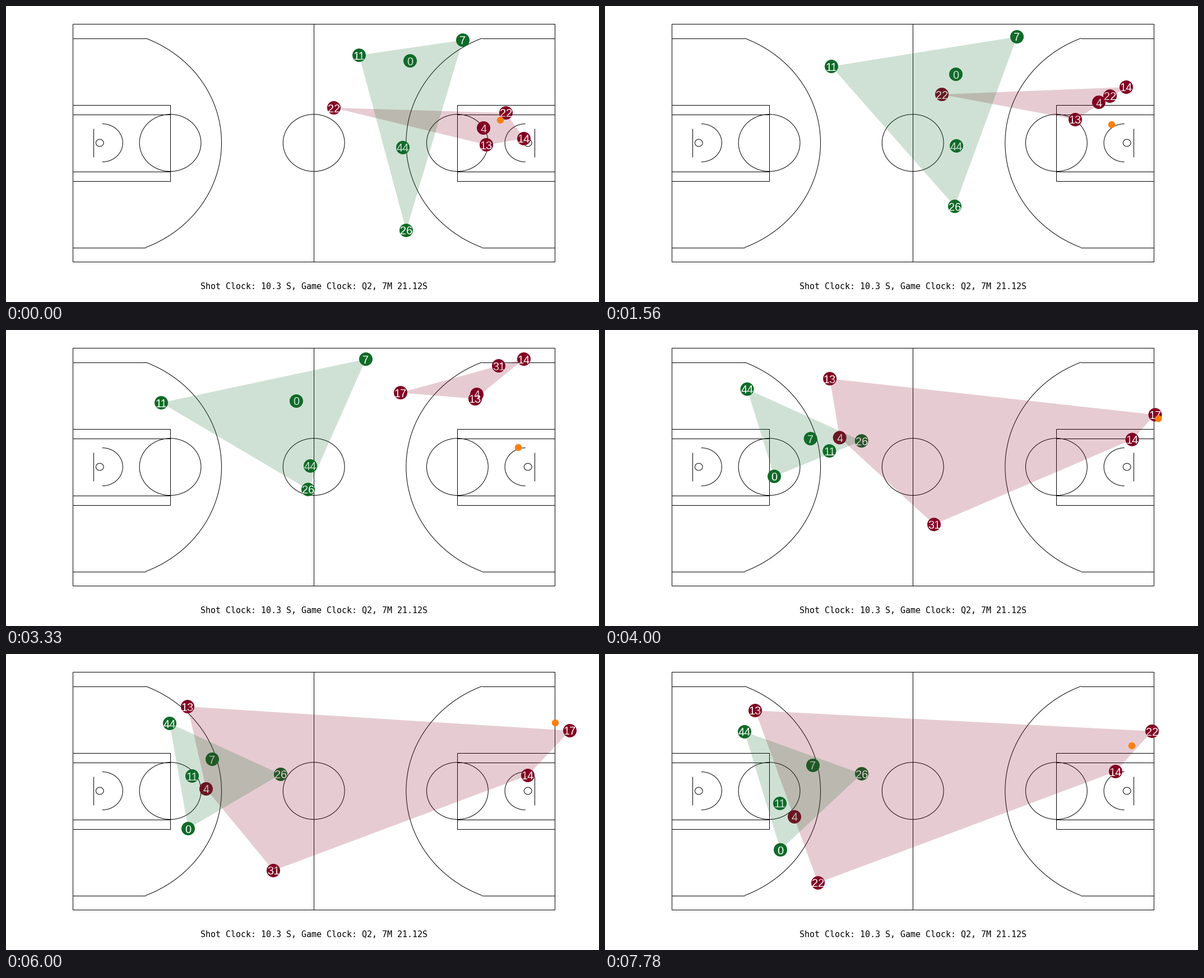
A matplotlib script that plays this animation: 1058x529 px, repeating every 8000 ms.

```python
import numpy as np
import matplotlib.pyplot as plt
from matplotlib.animation import FuncAnimation
from matplotlib.patches import Circle, Ellipse, Polygon, Rectangle

W, H, DPI = 1058, 529, 100
PT = 72 / DPI                       # points per pixel
LOOP_MS, TICK_MS, STEPS = 8000, 50, 36
STEP_MS = LOOP_MS / STEPS           # positions change once per step
CUT, SUB_IN, SUB_OUT = 18, 13, 31   # new possession; substitutions
LEG_TIMES = (0, 7, 15), (22, 27, 35)
GREEN, MAROON, ORANGE = "#0f6b28", "#820022", "#ff7f0e"


def locate(legs, step):
    """Constant acceleration through the three key points of a leg."""
    leg = int(step >= CUT)
    t0, t1, t2 = LEG_TIMES[leg]
    p0, p1, p2 = np.array(legs[leg], float)
    v1, v2 = (p1 - p0) / (t1 - t0), (p2 - p1) / (t2 - t1)
    bend = (v2 - v1) / (t2 - t0)
    return p0 + (step - t0) * (v1 + (step - t1) * bend)


def convex_hull(points):
    pts = sorted(map(tuple, points))

    def chain(seq):
        out = []
        for p in seq:
            while len(out) > 1:
                (ax_, ay), (bx, by) = out[-2:]
                if (bx - ax_) * (p[1] - ay) - (by - ay) * (p[0] - ax_) > 0:
                    break
                out.pop()
            out.append(p)
        return out[:-1]

    return chain(pts) + chain(pts[::-1])


fig = plt.figure(figsize=(W / DPI, H / DPI), dpi=DPI, facecolor="white")
ax = fig.add_axes([0, 0, 1, 1])
ax.set_xlim(0, W)
ax.set_ylim(H, 0)
ax.axis("off")

# Court, in feet: 94 by 50
LEFT, TOP, FX, FY = 119.2, 32.1, 860 / 94, 8.5
PEN = dict(lw=PT, color="black", zorder=1)


def line(*feet):
    xs, ys = zip(*feet)
    ax.plot(LEFT + np.array(xs) * FX, TOP + np.array(ys) * FY,
            solid_capstyle="butt", **PEN)


def box(x0, y0, x1, y1):
    ax.add_patch(Rectangle((LEFT + x0 * FX, TOP + y0 * FY), (x1 - x0) * FX,
                           (y1 - y0) * FY, fill=False, **PEN))


def ring(x, r):
    ax.add_patch(Ellipse((LEFT + x * FX, TOP + 25 * FY), 2 * r * FX,
                         2 * r * FY, fill=False, **PEN))


def draw_half(mirrored):
    def fx(x):
        return 94 - x if mirrored else x

    def arc(x, r, half_angle):
        a = np.linspace(-half_angle, half_angle, 120)
        line(*[(fx(x + r * np.cos(v)), 25 + r * np.sin(v)) for v in a])

    reach = np.arcsin(22 / 23.75)
    corner = 5.25 + 23.75 * np.cos(reach)
    for y in (3, 47):
        line((fx(0), y), (fx(corner), y))
    arc(5.25, 23.75, reach)
    arc(5.74, 4, np.pi / 2)
    for half_width in (8, 6):
        box(fx(0), 25 - half_width, fx(19), 25 + half_width)
    ring(fx(19), 6)
    ring(fx(5.25), 0.75)
    line((fx(4), 22), (fx(4), 28))


box(0, 0, 94, 50)
line((47, 0), (47, 50))
ring(47, 6)
for mirrored in (False, True):
    draw_half(mirrored)

ax.text(549.5, 505.5, "Shot Clock: 10.3 S, Game Clock: Q2, 7M 21.12S",
        family="DejaVu Sans Mono", size=15 * PT, ha="center", va="baseline")


class Player:
    def __init__(self, number, first_leg, second_leg, sub=None):
        self.number, self.sub = number, sub or number
        self.legs = first_leg, second_leg

    def dress(self, color):
        self.dot = ax.add_patch(Circle((0, 0), 12, fc=color, lw=0, zorder=2))
        self.label = ax.text(0, 0, "", family="Liberation Sans", color="white",
                             size=20 * PT, ha="center", va="baseline",
                             zorder=3)

    def move(self, step):
        x, y = locate(self.legs, step)
        self.dot.center = x, y
        self.label.set_position((x, y + 7.5))
        self.label.set_text(self.sub if SUB_IN <= step < SUB_OUT
                            else self.number)
        return x, y


class Team:
    def __init__(self, color, hull_z, players):
        self.players = players
        for player in players:
            player.dress(color)
        self.hull = ax.add_patch(Polygon([(0, 0)] * 3, fc=color, lw=0,
                                         alpha=0.2, zorder=hull_z))

    def move(self, step):
        self.hull.set_xy(convex_hull([p.move(step) for p in self.players]))


maroon = Team(MAROON, 4, [
    Player("22", [(585, 182), (601, 158), (704, 112)],
           [(1000, 143), (1006, 137), (976, 138)], sub="17"),
    Player("22", [(892, 191), (901, 161), (879, 64)],
           [(538, 367), (477, 387), (380, 409)], sub="31"),
    Player("4", [(852, 218), (881, 172), (840, 115)],
           [(386, 213), (357, 241), (338, 291)]),
    Player("13", [(857, 248), (839, 203), (837, 123)],
           [(365, 90), (324, 94), (268, 101)]),
    Player("14", [(924, 237), (930, 145), (924, 52)],
           [(938, 209), (931, 217), (911, 210)]),
])
green = Team(GREEN, 5, [
    Player("11", [(630, 88), (404, 108), (277, 130)],
           [(364, 210), (332, 218), (312, 267)]),
    Player("0", [(721, 98), (626, 122), (518, 127)],
           [(317, 285), (325, 312), (313, 350)]),
    Player("7", [(815, 61), (735, 55), (642, 52)],
           [(367, 189), (368, 188), (371, 199)]),
    Player("44", [(708, 253), (627, 250), (543, 243)],
           [(282, 114), (292, 124), (249, 139)]),
    Player("26", [(714, 401), (624, 358), (539, 285)],
           [(481, 208), (490, 215), (458, 214)]),
])
ball = ax.add_patch(Circle((0, 0), 6.2, fc=ORANGE, lw=0, zorder=6))
BALL_LEGS = ([(882, 204), (904, 212), (914, 210)],
             [(989, 132), (980, 123), (940, 164)])


def update(tick):
    # A tick shows the latest step that begins within it.
    step = min(int((tick + 1) * TICK_MS / STEP_MS), STEPS - 1)
    maroon.move(step)
    green.move(step)
    ball.center = locate(BALL_LEGS, step)
    return []


anim = FuncAnimation(fig, update, frames=LOOP_MS // TICK_MS, interval=TICK_MS,
                     init_func=lambda: update(0), repeat=True, repeat_delay=0)
plt.show()
```
